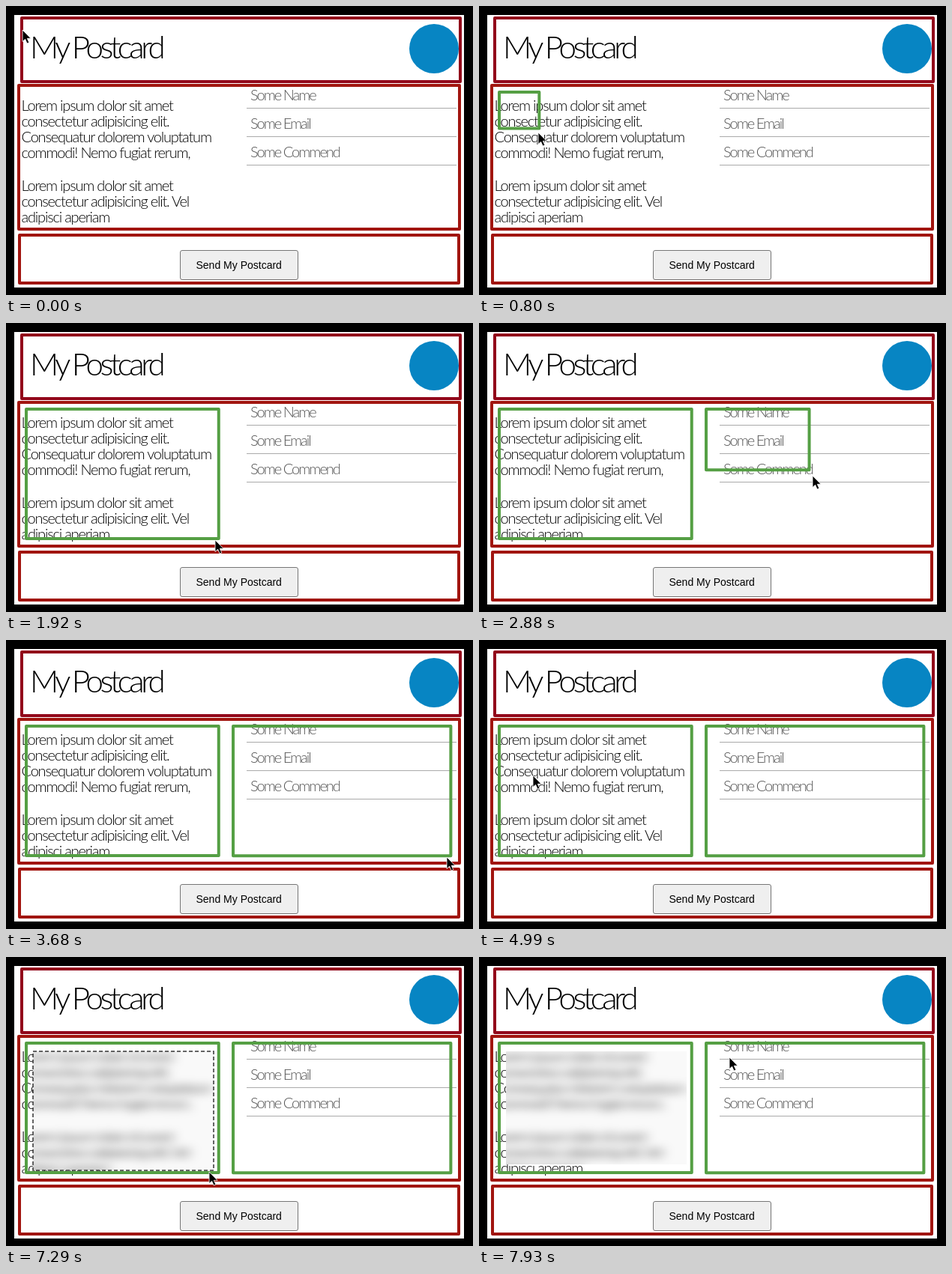
These frames come from a looping animation (623 by 386 pixels, 8000 ms). An HTML page:

```html
<!DOCTYPE html>
<html lang="en">
<head>
<meta charset="utf-8">
<title>Postcard layout sketch</title>
<style>
  html, body { margin: 0; width: 100%; height: 100%; overflow: hidden; background: #000; }
  svg { display: block; width: 623px; height: 386px; }
  .thin { font-family: Lato, sans-serif; font-weight: 300; fill: #000; }
  #title { font-size: 42px; letter-spacing: -4.4px; }
  #copy { font-size: 20px; letter-spacing: -1.2px; }
  #fields { font-size: 20px; letter-spacing: -2px; fill: #555; }
  #fields path { stroke: #aaa; }
  .button { font: 14px "Liberation Sans", Arial, sans-serif; }
  .frame { fill: none; stroke-width: 4; stroke-linejoin: round; }
  .red { stroke: #a1150f; }
  .green { stroke: #559f44; }
</style>
</head>
<body>
<svg viewBox="0 0 623 386">
  <defs>
    <filter id="soft" x="-.1" y="-.2" width="1.2" height="1.4"><feGaussianBlur stdDeviation="8 6"/></filter>
    <clipPath id="blurArea"><rect id="blurRect" x="36" y="126"/></clipPath>
  </defs>
  <rect x="11" y="12" width="600" height="364" fill="#fff"/>
  <text id="title" class="thin" x="32" y="70">My Postcard</text>
  <circle cx="571" cy="57" r="33" fill="#0785c3"/>
  <g id="copy" class="thin"></g>
  <g id="fields" class="thin"></g>
  <rect x="232.5" y="326.5" width="157" height="39" rx="2.5" fill="#efefef" stroke="#767676"/>
  <text class="button" x="253.5" y="351">Send My Postcard</text>
  <g clip-path="url(#blurArea)">
    <rect x="30" y="120" width="260" height="180" fill="#f9f9f9"/>
    <use href="#copy" filter="url(#soft)"/>
  </g>
  <rect class="frame" stroke="#92071a" x="21" y="16" width="585" height="85"/>
  <rect class="frame red" x="17" y="106" width="588" height="192"/>
  <rect class="frame red" x="18" y="306" width="586" height="64"/>
  <rect id="leftBox" class="frame green" x="27" y="115"/>
  <rect id="rightBox" class="frame green" x="303" y="115"/>
  <rect id="selection" x="36" y="126" fill="none" stroke="#333" stroke-width="1.5" stroke-dasharray="5 3"/>
  <path id="cursor" d="M0 0v15.5l3.6-3.2 2.5 5.7 2.7-1.2-2.5-5.5h4.8z" stroke="#fff" stroke-width=".8"/>
</svg>
<script>
const LOOP = 8000, STEP = 160;
const $ = id => document.getElementById(id);

const paragraphs = [
  [140, ["Lorem ipsum dolor sit amet", "consectetur adipisicing elit.",
         "Consequatur dolorem voluptatum", "commodi! Nemo fugiat rerum,"]],
  [247, ["Lorem ipsum dolor sit amet", "consectetur adipisicing elit. Vel", "adipisci aperiam"]]
];
$("copy").innerHTML = paragraphs.map(([top, lines]) =>
  lines.map((line, i) => `<text x="20.5" y="${top + i * 21}">${line}</text>`).join("")).join("");
$("fields").innerHTML = ["Name", "Email", "Commend"].map((label, i) =>
  `<text x="326" y="${126 + i * 38}">Some ${label}</text><path d="M321 ${136.5 + i * 38}h280"/>`).join("");

// Pointer path: time, x, y
const path = [
  [0, 22, 32], [320, 20, 113], [480, 20, 113], [800, 79, 169], [1120, 160, 228],
  [1760, 277, 289], [1920, 279, 290], [2080, 290, 284], [2240, 306, 200],
  [2400, 294, 113], [2560, 294, 113], [3200, 596, 295], [3360, 594, 294], [3680, 588, 290],
  [4510, 480, 260], [4670, 290, 220], [4830, 140, 190], [4990, 72, 181],
  [6490, 61, 169], [6650, 29, 125], [6810, 45, 140], [7290, 271, 287],
  [7450, 271, 287], [7610, 290, 240], [7930, 334, 134]
];

function pointer(t) {
  const i = path.findIndex(p => p[0] >= t);
  if (i < 0) return path[path.length - 1].slice(1);
  if (i === 0) return path[0].slice(1);
  const [t0, x0, y0] = path[i - 1], [t1, x1, y1] = path[i];
  const k = (t - t0) / (t1 - t0);
  return [x0 + (x1 - x0) * k, y0 + (y1 - y0) * k];
}

function stepTime(t) {
  const [start, end] = t < 4510 ? [0, 3680] : t < 6490 ? [4510, 4990] : [6490, 7930];
  return Math.min(end, start + Math.floor((t - start) / STEP) * STEP);
}

function resize(rect, right, bottom, visible) {
  rect.setAttribute("width", Math.max(0, right - rect.x.baseVal.value));
  rect.setAttribute("height", Math.max(0, bottom - rect.y.baseVal.value));
  rect.style.display = visible ? "" : "none";
}

function dragBox(id, t, start, end) {
  const [x, y] = pointer(Math.min(t, end) - 20);
  resize($(id), x + 5, y - 2, t > start);
}

function draw(time) {
  const t = stepTime(time % LOOP);
  const [x, y] = pointer(t);
  $("cursor").setAttribute("transform", `translate(${x} ${y})`);
  dragBox("leftBox", t, 480, 1920);
  dragBox("rightBox", t, 2560, 3680);

  const released = t > 7450;
  resize($("selection"), x + 6, y - 2, t > 6650 && !released);
  resize($("blurRect"), released ? 277 : x + 6, released ? 277 : y - 2, t > 6650);
}

const began = performance.now();
function tick() {
  draw(performance.now() - began);
  requestAnimationFrame(tick);
}
tick();
</script>
</body>
</html>
```
